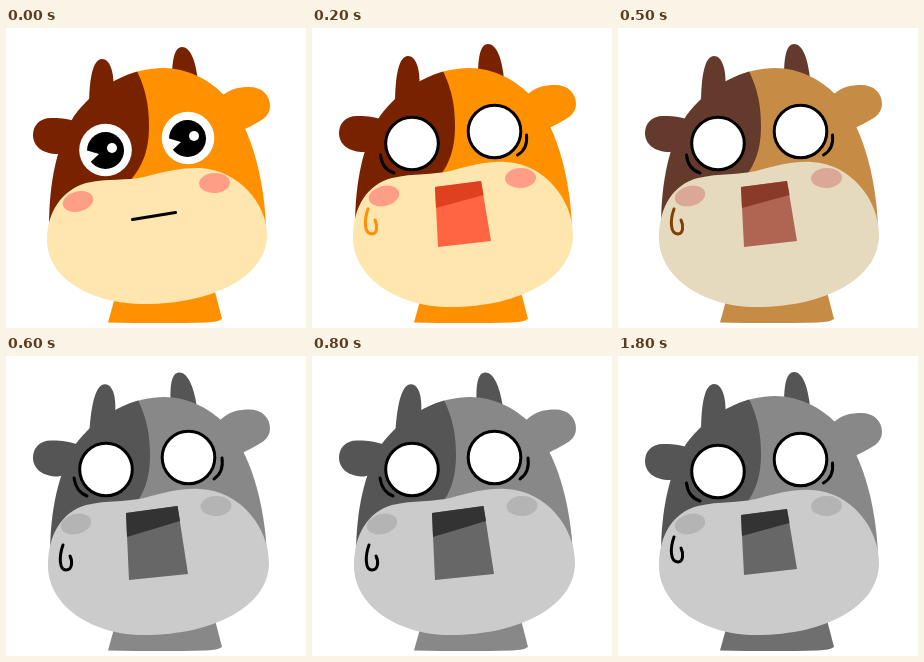
Recreate the animation shown at these times as an HTML page with a canvas. Size 300 px wide and 300 px high, loop 1.9 s.

```html
<!DOCTYPE html>
<html lang="en">
<head>
<meta charset="utf-8">
<title>Shocked cow</title>
<style>
html, body { margin: 0; width: 100%; height: 100%; overflow: hidden; background: #fff; }
canvas { display: block; width: 100vmin; height: 100vmin; }
</style>
</head>
<body>
<canvas id="stage" width="300" height="300"></canvas>
<script>
const ctx = document.getElementById('stage').getContext('2d');

const vivid = { skin: '#ff9000', dark: '#782200', muzzle: '#ffe5ae', cheek: '#ff9e87', throat: '#e03f20', tongue: '#ff6543', sweat: '#ff9000' };
const faded = { skin: '#c68c45', dark: '#643a2c', muzzle: '#e5d9be', cheek: '#dba898', throat: '#8c3a28', tongue: '#b06553', sweat: '#804000' };
const gray = { skin: '#888888', dark: '#555555', muzzle: '#cbcbcb', cheek: '#b4b4b4', throat: '#333333', tongue: '#676767', sweat: '#000000' };
const grayShade = { ...gray, neck: '#6f6f6f' };

const shape = {
  head: 'M43 200C43 150 52 116 68 88C90 58 125 40 157 40C181 40 203 52 217 66C243 94 258 145 260 200Z',
  patch: 'M20 0H120L131 43C140 62 143 78 143 98C143 120 138 138 122 155L20 220Z',
  neck: 'M111 262L102 294.5Q155 295.5 200 294.5Q212 294 216 291L208 260Z',
  earL: 'M72 94C60 90 52 90 45 90C33 90 27 98 27 107C27 118 36 126 52 126L80 120Z',
  earR: 'M210 74C222 60 234 59 243 59C256 59 264 67 264 78C264 89 255 93 239 101L225 110Z',
  hornL: 'M83 80C83 50 87 31 96 31C104 31 108 44 107.5 60Z',
  hornR: 'M166 50C166 30 169 19 176 19C184 19 190 32 192 55Z'
};

const calm = {
  ear: 0, hornY: 0, tilt: 0, head: [0, 0],
  muzzle: 'M41 212C41 184 56 162 80 155C102 150 121 153 138 149C160 143 176 139.5 194 140C233 142 261 176 261 207C261 247 210 276 138 276C85 276 41 250 41 212Z',
  cheeks: [[72, 173.5], [208.5, 155]]
};
const poseA = {
  ear: -2, hornY: -3, tilt: 0, head: [0, 0],
  muzzle: 'M41 210C41 178 56 156 80 150C102 145 121 147 138 143C160 137 176 133 194 134C233 136 261 172 261 207C261 249 210 279 138 279C85 279 41 249 41 210Z',
  cheeks: [[72, 168], [208.5, 150]],
  eyes: [[100, 115.5], [182.5, 103.5]],
  lines: 'M68.5 127Q70 141 82 145M214.5 107Q216 121 205.5 127',
  mouth: 'M123 159L169 153L179 213L126 219Z',
  throat: 'M123 159L169 153L171.5 167L124 180Z',
  sweat: 'M56 181C52 192 52 206 60 206C65 206 66 198 63 192'
};
const poseB = {
  ear: -5.5, hornY: -3, tilt: 0.06, head: [1, 1],
  muzzle: 'M42 210C42 178 56 156 80 149C102 144 121 146 138 142C160 136 176 132 194 133C235 135 263 172 263 207C263 249 210 279 138 279C85 279 42 249 42 210Z',
  cheeks: [[70, 168], [210, 150]],
  eyes: [[100, 113.5], [182.5, 101.5]],
  lines: 'M68 122Q70 136 81 140M216 102Q218 116 208 123',
  mouth: 'M120 157L171.5 150L182 218L123 224Z',
  throat: 'M120 157L171.5 150L174 165L121 181Z',
  sweat: 'M57 189C53 200 53 214 60 214C66 214 67 206 64 200'
};

// start time in ms, pose, colours
const steps = [
  [0, calm, vivid], [200, poseA, vivid], [300, poseB, vivid], [400, poseA, vivid],
  [500, poseA, faded], [600, poseB, gray], [700, poseA, gray], [800, poseB, gray],
  [1800, poseA, grayShade]
];

function fill(path, color, x = 0, y = 0) {
  ctx.save();
  ctx.translate(x, y);
  ctx.fillStyle = color;
  ctx.fill(new Path2D(path));
  ctx.restore();
}

function line(path, color, width) {
  ctx.strokeStyle = color;
  ctx.lineWidth = width;
  ctx.stroke(new Path2D(path));
}

function oval(x, y, rx, ry, color, turn = 0) {
  ctx.beginPath();
  ctx.ellipse(x, y, rx, ry, turn, 0, 7);
  ctx.fillStyle = color;
  ctx.fill();
}

// Tilts a horn around a point at its root.
function horn(path, color, x, y, dy, turn) {
  ctx.save();
  ctx.translate(x, y + dy);
  ctx.rotate(turn);
  fill(path, color, -x, -y);
  ctx.restore();
}

function headPart(region, color) {
  ctx.save();
  ctx.clip(new Path2D(region));
  fill(shape.head, color);
  ctx.restore();
}

function calmEye(x, y, px, py) {
  oval(x, y, 26.3, 26.3, '#fff');
  oval(px, py, 18.5, 18.5, '#000');
  fill('M-6.5 3.5L-20 -0.5V14L-15 11.5Z', '#fff', px, py);
  oval(px + 6.5, py - 2.5, 5, 5, '#fff');
}

function shockedEye([x, y]) {
  oval(x, y, 26.3, 26.3, '#fff');
  ctx.strokeStyle = '#000';
  ctx.lineWidth = 3;
  ctx.stroke();
}

function draw(pose, c) {
  ctx.fillStyle = '#fff';
  ctx.fillRect(0, 0, 300, 300);
  ctx.lineCap = 'round';

  fill(shape.neck, c.neck || c.skin);
  horn(shape.hornL, c.dark, 92, 85, pose.hornY, pose.tilt);
  horn(shape.hornR, c.dark, 182, 70, pose.hornY, -pose.tilt);
  fill(shape.earL, c.dark, 0, pose.ear);
  fill(shape.earR, c.skin, 0, pose.ear);
  ctx.save();
  ctx.translate(...pose.head);
  headPart('M115 0H300V300H115Z', c.skin);
  headPart(shape.patch, c.dark);
  ctx.restore();

  if (!pose.eyes) {
    calmEye(99.5, 122, 99.5, 122.5);
    calmEye(182, 110, 181.5, 110.5);
  }
  fill(pose.muzzle, c.muzzle);
  pose.cheeks.forEach(([x, y], i) => oval(x, y, 15.5, 10, c.cheek, i ? -0.05 : -0.25));

  if (pose.eyes) {
    pose.eyes.forEach(shockedEye);
    line(pose.lines, '#000', 3);
    fill(pose.mouth, c.tongue);
    fill(pose.throat, c.throat);
    line(pose.sweat, c.sweat, 3);
  } else {
    line('M126.5 191.5L169.5 184.5', '#000', 3.2);
  }
}

const start = performance.now();
function tick() {
  const t = (performance.now() - start) % 1900;
  const [, pose, colors] = steps.findLast(s => s[0] <= t);
  draw(pose, colors);
  requestAnimationFrame(tick);
}
tick();
</script>
</body>
</html>
```
